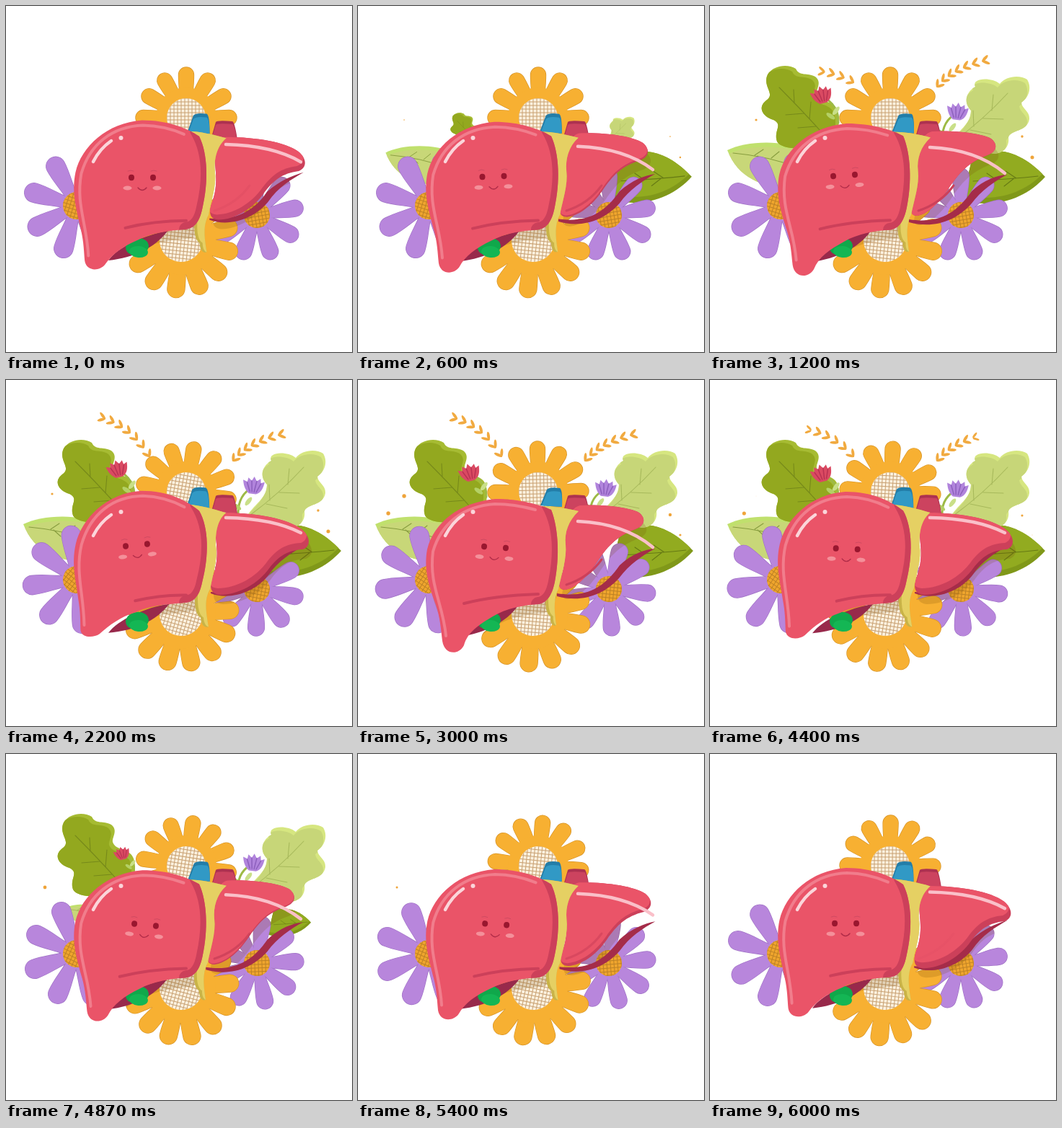
An HTML page with a canvas for the animation above (6.07 s loop, 480x480 px).

```html
<!DOCTYPE html>
<html lang="en">
<head>
<meta charset="utf-8">
<title>Happy liver</title>
<style>
html, body { margin: 0; width: 100%; height: 100%; overflow: hidden; background: #fff; }
canvas { display: block; width: 100vmin; height: 100vmin; }
</style>
</head>
<body>
<canvas width="480" height="480"></canvas>
<script>
const canvas = document.querySelector('canvas');
const ctx = canvas.getContext('2d');
const LOOP = 6070, STEPS = 91, TAU = Math.PI * 2;
const BEATS = [0, 1.2, 2.2, 3, 3.87, 4.87, 6, 6.07];

const clamp = v => Math.max(0, Math.min(1, v));
const smooth = v => { v = clamp(v); return v * v * (3 - 2 * v); };
const mix = (a, b, k) => a + (b - a) * k;
const ramp = (t, from, to) => smooth((t - from) / (to - from));
const visible = (t, inA, inB, outA, outB) => ramp(t, inA, inB) * (1 - ramp(t, outA, outB));

// Eases through one value per beat, closing on the first value.
function track(t, values) {
  let i = 0;
  while (i < BEATS.length - 2 && t >= BEATS[i + 1]) i++;
  const next = i + 1 < values.length ? values[i + 1] : values[0];
  return mix(values[i], next, ramp(t, BEATS[i], BEATS[i + 1]));
}

// Interpolates two path strings that share the same commands.
function morph(a, b, k) {
  const goals = b.match(/-?[\d.]+/g);
  let i = 0;
  return new Path2D(a.replace(/-?[\d.]+/g, n => mix(+n, +goals[i++], k).toFixed(2)));
}

function fill(path, color) { ctx.fillStyle = color; ctx.fill(path); }
function line(path, color, width) {
  ctx.strokeStyle = color;
  ctx.lineWidth = width;
  ctx.stroke(typeof path === 'string' ? new Path2D(path) : path);
}
function oval(x, y, rx, ry, color, turn = 0) {
  ctx.fillStyle = color;
  ctx.beginPath();
  ctx.ellipse(x, y, rx, ry, turn, 0, TAU);
  ctx.fill();
}
function dot(x, y, r) { oval(x, y, r, r, '#efa43a'); }
function scoped(draw) { ctx.save(); draw(); ctx.restore(); }
function around(x, y, scale, turn, draw) {
  if (scale < 0.01) return;
  scoped(() => {
    ctx.translate(x, y);
    ctx.rotate(turn);
    ctx.scale(scale, scale);
    ctx.translate(-x, -y);
    draw();
  });
}
// Body colour shifted inside the silhouette leaves a shaded rim.
function shaded(path, body, rim, dx, dy) {
  fill(path, rim);
  scoped(() => {
    ctx.clip(path);
    ctx.translate(dx, dy);
    fill(path, body);
  });
}

const YELLOW = { petal: '#f7b032', edge: '#d79427', base: 0.6, root: 0.1, tip: 0.15,
  heart: '#fbf1df', mesh: '#c8a071' };
const PURPLE = { petal: '#b886dc', edge: '#9f71c5', base: 0.25, root: 0.09, tip: 0.175,
  heart: '#efa52d', mesh: '#bd8125' };

function flower(x, y, r, petals, degrees, heart, look) {
  const tip = r * look.tip, root = r * look.root;
  const petal = new Path2D(`M0 ${-root} C${r * 0.35} ${-root} ${r * 0.55} ${-tip} ${r - tip} ${-tip}` +
    `A${tip} ${tip} 0 0 1 ${r - tip} ${tip} C${r * 0.55} ${tip} ${r * 0.35} ${root} 0 ${root}Z`);
  const eachPetal = draw => {
    for (let i = 0; i < petals; i++) {
      scoped(() => { ctx.rotate(i * TAU / petals); draw(); });
    }
  };
  scoped(() => {
    ctx.translate(x, y);
    ctx.rotate(degrees * Math.PI / 180);
    eachPetal(() => line(petal, look.edge, 1.4));
    eachPetal(() => fill(petal, look.petal));
    oval(0, 0, r * look.base, r * look.base, look.petal);
    oval(0, 0, heart, heart, look.heart);
    ctx.clip();
    for (let p = -heart; p < heart; p += 5) {
      line(`M${p} ${-heart} V${heart} M${-heart} ${p} H${heart}`, look.mesh, 1);
    }
  });
}

const LEAVES = [
  { at: [130, 225], time: [0.1, 0.75, 4.55, 5.15], body: '#c8d778', rim: '#c0e06d', vein: '#879d3e', shift: [0, 6],
    shape: 'M24 200 C50 187 100 185 135 200 L135 250 C85 256 42 246 24 200Z',
    veins: 'M32 204 Q80 208 125 225 M62 207 L74 199 M66 208 L76 217 M85 211 L96 202' },
  { at: [378, 230], time: [0.1, 0.65, 4.55, 5.2], body: '#92ab20', rim: '#809819', vein: '#667a14', shift: [0, -8],
    shape: 'M465 237 C440 211 410 192 365 205 L350 270 C400 282 440 265 465 237Z',
    veins: 'M455 236 Q420 240 365 243 M425 239 L410 229 M422 239 L408 250 M397 241 L384 232' },
  { at: [165, 190], time: [0.3, 1, 4.95, 5.4], body: '#93a81f', rim: '#a6bb32', vein: '#76891a', shift: [-5, 4],
    shape: 'M172 185 C150 200 100 202 93 188 C88 172 102 165 88 158 C72 153 66 140 78 131 C92 122 72 112 80 95 C88 82 108 80 119 87 C124 98 135 92 146 98 C156 106 147 115 148 122 C152 135 172 130 177 145 C182 160 177 175 172 185Z',
    veins: 'M96 113 Q128 145 162 183 M117 135 L116 116 M130 149 L105 151 M138 157 L140 133 M147 167 L122 169' },
  { at: [345, 190], time: [0.3, 1, 4.95, 5.4], body: '#c7d678', rim: '#d6e680', vein: '#a7b95b', shift: [-3, 5],
    shape: 'M330 195 C345 170 362 165 362 145 C350 132 357 118 368 112 C362 100 390 98 402 108 C410 97 430 95 440 102 C447 114 442 127 432 134 C433 143 444 146 443 157 C440 175 418 171 414 182 C416 196 406 204 395 205Z',
    veins: 'M338 188 Q380 157 413 121 M391 145 L393 123 M379 156 L407 157 M366 167 L365 145 M361 172 L390 178' }
];

function drawLeaf(leaf, t) {
  around(...leaf.at, visible(t, ...leaf.time), 0, () => {
    shaded(new Path2D(leaf.shape), leaf.body, leaf.rim, ...leaf.shift);
    line(leaf.veins, leaf.vein, 1.1);
  });
}

function bud(x, y, rootX, rootY, turn, scale, color, dark) {
  around(rootX, rootY, scale, 0, () => {
    line(`M${rootX} ${rootY} Q${rootX} ${mix(rootY, y, 0.7)} ${x} ${y}`, '#9dba45', 3);
    oval(mix(x, rootX, 0.6) + 6, mix(y, rootY, 0.55), 7, 3, '#c9df88', -0.9);
    oval(mix(x, rootX, 0.8) - 6, mix(y, rootY, 0.75), 7, 3, '#b4d065', 0.6);
    ctx.translate(x, y);
    ctx.rotate(turn);
    fill(new Path2D('M-5 10 C-13 4 -14 -4 -15 -8 L-9 -6 L-8 -12 L-3 -8 L0 -14 L4 -8 L9 -12 L10 -6 L15 -8 C14 1 12 7 5 10Z'), color);
    line('M-9 -5 L-4 7 M-3 -8 L-1 7 M4 -8 L2 7 M10 -5 L5 7', dark, 1.5);
  });
}

function wheat(x, y, cx, cy, ex, ey, amount, turn) {
  if (amount < 0.05) return;
  const pairs = 7;
  around(x, y, 1, turn, () => {
    for (let i = 0; i < pairs; i++) {
      const u = i / (pairs - 0.6), v = 1 - u;
      const size = clamp(amount * pairs - i);
      const px = v * v * x + 2 * u * v * cx + u * u * ex;
      const py = v * v * y + 2 * u * v * cy + u * u * ey;
      const angle = Math.atan2(mix(cy - y, ey - cy, u), mix(cx - x, ex - cx, u));
      for (const side of [-1, 1]) {
        const a = angle + side * 0.6;
        oval(px + Math.cos(a) * 5, py + Math.sin(a) * 5, 6 * size, 2 * size, '#f1aa40', a);
      }
    }
  });
}

function drawGarden(t) {
  LEAVES.forEach(leaf => drawLeaf(leaf, t));
  const sway = track(t, [0, 0, 21, 16, 24, 8, 0]);
  const nod = track(t, [0, 0, 10, -1, -1, 9, 0.5]);
  flower(98, 277, 75, 8, 17 + sway, 19, PURPLE);
  flower(348, 290, 65, 9, -10 + sway, 18, PURPLE);
  flower(250, 155, 70, 12, nod, 27, YELLOW);
  flower(243, 325, 80, 13, 96 + nod, 30, YELLOW);

  const lift = track(t, [6, 0, 0, 5, 6, 6, 6]);
  bud(155, 125 + lift, 178, 162, -0.25, visible(t, 0.6, 1.1, 4.7, 5.2), '#da4a62', '#b93252');
  bud(343, 148 + lift * 0.7, 322, 185, 0.12, visible(t, 0.6, 1.1, 4.9, 5.3), '#b184dc', '#8d60bd');

  wheat(315, 112, 336, 86, 384, 75, visible(t, 0.7, 1.15, 4.2, 4.7), 0);
  const left = visible(t, 0.85, 1.5, 4.2, 4.7);
  wheat(199, 106, 174, 64, 132, 52, left, (left - 1) * 1.2);

  dot(64, track(t, [158, 158, 158, 161, 161, 161, 158]), track(t, [0, 1.6, 1.6, 2.7, 0.5, 0, 0]));
  dot(track(t, [42, 42, 42, 42, 42, 54, 54]), 185, track(t, [0, 0, 0, 2.7, 2.7, 2.4, 0]));
  dot(433, track(t, [181, 181, 181, 187, 188, 188, 181]), track(t, [0, 1.7, 1.7, 2.2, 2.8, 0, 0]));
  dot(447, track(t, [210, 210, 210, 215, 215, 215, 210]), track(t, [0, 2.5, 2.5, 1.6, 0.8, 0, 0]));
}

function drawFace(t) {
  scoped(() => {
    ctx.translate(track(t, [189, 186, 181, 190, 187, 193, 188]), track(t, [238, 235, 229, 232, 232, 237, 235]));
    ctx.rotate(track(t, [0, -0.07, -0.1, 0.07, 0, 0.1, 0]));
    for (const side of [-1, 1]) {
      oval(side * 15, 0, 4, 4.2, '#99172f');
      oval(side * 20.5, 14.5, 6, 3, '#f4909a');
      line(`M${side * 12} -9 Q${side * 16} -11 ${side * 20} -9`, '#c94860', 0.8);
    }
    line('M-6 14 Q0 21 6 14', '#b02c48', 1.3);
  });
}

function drawLiver(t) {
  const p = track(t, [0.57, 0.87, 0.25, 1, 0, 0.75, 0.53]);
  const curl = ramp(p, 0.45, 0.85);
  const lobe = morph(
    'M187 150 C140 152 105 190 97 225 C90 255 97 275 99 310 C100 325 99 337 99 343 C101 350 115 350 124 347 C142 336 155 325 178 320 C200 310 225 311 250 308 C264 306 269 295 272 280 C282 245 283 205 268 182 C250 165 225 150 187 150Z',
    'M190 165 C140 170 105 198 96 235 C91 262 98 285 108 312 C114 330 115 345 117 362 C120 382 140 382 147 368 C152 350 167 340 187 328 C205 317 230 312 250 311 C264 309 270 295 273 280 C280 245 278 205 268 180 C252 173 225 165 190 165Z', p);
  const wing = morph(
    'M305 184 C350 185 390 192 410 207 C422 217 424 230 412 235 C390 236 378 245 366 260 C350 283 322 298 297 298 C284 297 282 288 286 275 C298 245 290 225 291 210 C292 195 296 186 305 184Z',
    'M308 174 C340 172 378 177 390 184 C400 192 398 202 385 207 C358 217 345 232 330 255 C315 277 300 289 288 291 C278 291 278 285 281 275 C292 245 284 225 287 210 C290 192 296 176 308 174Z', curl);

  scoped(() => {
    ctx.globalCompositeOperation = 'source-atop';
    ctx.globalAlpha = 0.18;
    ctx.translate(4, 13);
    fill(lobe, '#704000');
    fill(wing, '#704000');
  });

  // Underside, gallbladder and vessels.
  fill(morph('M142 349 C155 332 195 313 228 310 C208 334 182 346 142 349Z',
    'M142 356 C155 335 190 322 222 313 C205 337 175 351 142 356Z', p), '#98294b');
  oval(182, 334, 16, 12, '#10a84b', -0.15);
  oval(184, 341, 13, 8, '#14b654', 0.1);
  fill(morph('M284 296 C310 306 345 295 364 271 C378 250 396 240 413 230 C395 236 380 243 362 258 C345 283 320 297 284 294Z',
    'M276 300 C310 309 340 299 362 275 C376 256 395 243 412 234 C398 235 380 241 363 257 C340 290 315 302 276 296Z', curl), '#a52c49');
  const blue = morph('M250 176 L257 152 Q260 147 276 149 Q281 151 282 179Z',
    'M253 174 L262 152 Q266 148 280 150 Q284 152 283 176Z', p);
  shaded(blue, '#3199c5', '#237da8', 0, 5);
  shaded(new Path2D('M285 182 L291 161 Q293 158 314 160 Q317 160 321 185Z'), '#cc435f', '#ad3150', 0, 4);

  shaded(wing, '#ea5468', '#cc405a', mix(-3, 0, curl), mix(-9, 0, curl));
  scoped(() => {
    ctx.globalAlpha = curl;
    line('M289 284 Q320 274 338 249', '#cc405a', 3);
  });
  line(morph('M305 191 Q370 192 409 212', 'M305 196 Q370 199 409 232', curl), '#fac0c9', 4.5);

  const band = morph(
    'M250 172 C265 172 290 180 305 185 C292 195 292 215 292 230 C296 248 288 270 285 290 C275 305 280 325 283 343 C277 345 272 340 271 330 C262 325 262 305 263 290 C270 260 274 215 262 186Z',
    'M255 175 C270 175 290 178 306 182 C292 195 286 212 288 228 C290 248 282 270 278 290 C270 305 273 325 275 340 C270 343 266 336 267 328 C258 322 260 303 261 288 C266 258 272 212 262 182Z', p);
  shaded(band, '#e5d063', '#c9b347', 4, 0);

  fill(lobe, '#ea5468');
  scoped(() => {
    ctx.clip(lobe);
    line(morph('M266 172 C287 205 284 245 274 280 C271 296 264 307 250 308',
      'M264 172 C283 205 281 245 274 280 C271 296 264 310 250 311', p), '#cc405a', 20);
  });
  line(morph('M190 305 Q225 297 250 299', 'M147 310 Q190 299 250 297', p), '#cc405a', 4);
  line(morph('M104 335 C104 290 95 260 105 225 C118 180 150 157 190 157 C215 158 235 167 248 175',
    'M122 355 C118 310 98 285 104 238 C115 200 145 175 190 172 C215 172 235 177 246 180', p), '#f17d8c', 4);
  line('M121 216 Q130 198 146 187', '#fbd5da', 4.5);
  oval(159.5, 183, 3, 3, '#fbd5da');
  drawFace(t);
}

function render(now) {
  const step = Math.floor((now % LOOP) / LOOP * STEPS + 0.02);
  const t = Math.min(step, STEPS - 1) / 15;
  ctx.clearRect(0, 0, 480, 480);
  ctx.lineCap = ctx.lineJoin = 'round';
  drawGarden(t);
  drawLiver(t);
}

const start = performance.now();
function tick(now) {
  render(Math.max(0, now - start));
  requestAnimationFrame(tick);
}
tick(start);
</script>
</body>
</html>
```
